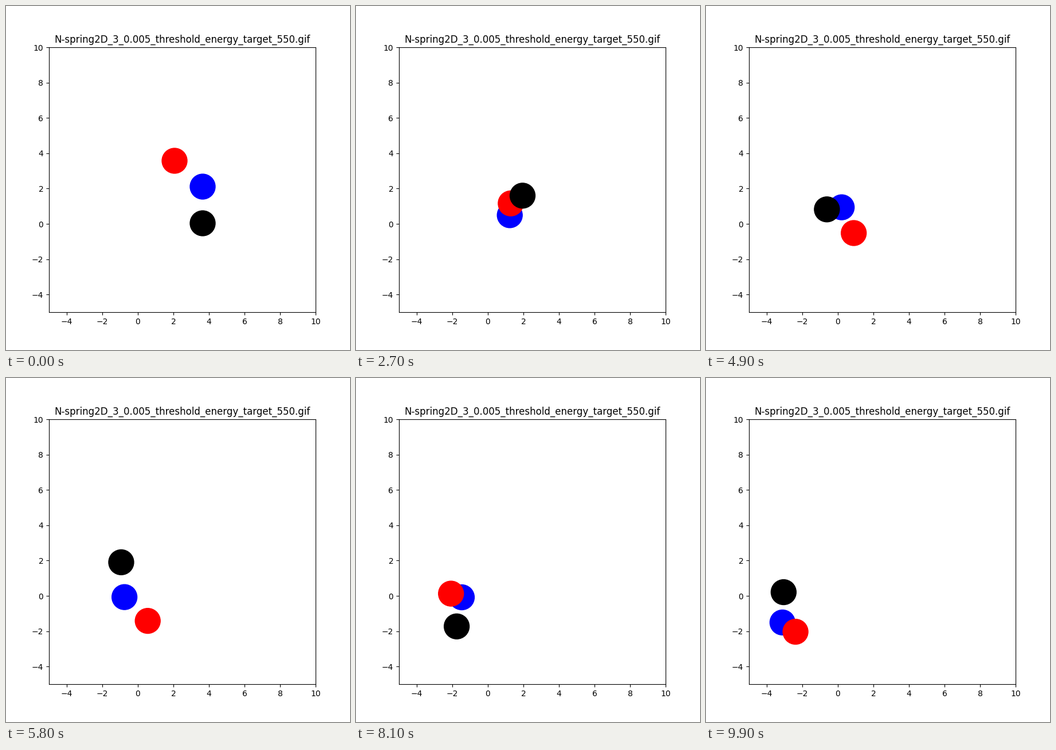
Write a matplotlib script that moves like this. It is 600 by 600 pixels and loops after 10000 ms.

```python
import numpy as np
import matplotlib.pyplot as plt
from matplotlib.animation import FuncAnimation

FRAMES = 100
INTERVAL = 100
OMEGA = 2 * np.pi / 38.5


def swing(t, a, b):
    """Oscillation whose cosine and sine amplitudes drift slowly with t."""
    return (np.polyval(a, t) * np.cos(OMEGA * t)
            + np.polyval(b, t) * np.sin(OMEGA * t))


def positions(t):
    """Blue, red and black masses: drifting centre plus spring motion."""
    centre = np.array([3.118 - 0.06029 * t, 1.905 - 0.03045 * t])
    # red minus black
    gap = np.array([
        swing(t, [9.7e-6, 0, -1.581], [0.00484, 1.065]),
        swing(t, [-1.95e-5, -0.00195, 3.539], [-0.01039, -0.357]),
    ])
    # blue relative to the centre of mass
    blue = np.array([
        swing(t, [-0.00268, 0.527], [-0.0008, 0.148]),
        swing(t, [-0.000325, 0.2045], [0.558]),
    ])
    return centre + np.array([blue, (gap - blue) / 2, (-gap - blue) / 2])


fig, ax = plt.subplots(figsize=(6, 6), dpi=100)
ax.set_xlim(-5, 10)
ax.set_ylim(-5, 10)
ax.set_title("N-spring2D_3_0.005_threshold_energy_target_550.gif")

start = positions(0)
balls = ax.scatter(start[:, 0], start[:, 1], s=1000, linewidths=1,
                   c=["blue", "red", "black"])


def update(i):
    balls.set_offsets(positions(i))
    return (balls,)


anim = FuncAnimation(fig, update, frames=FRAMES, interval=INTERVAL,
                     repeat=True, repeat_delay=0)
plt.show()
```
